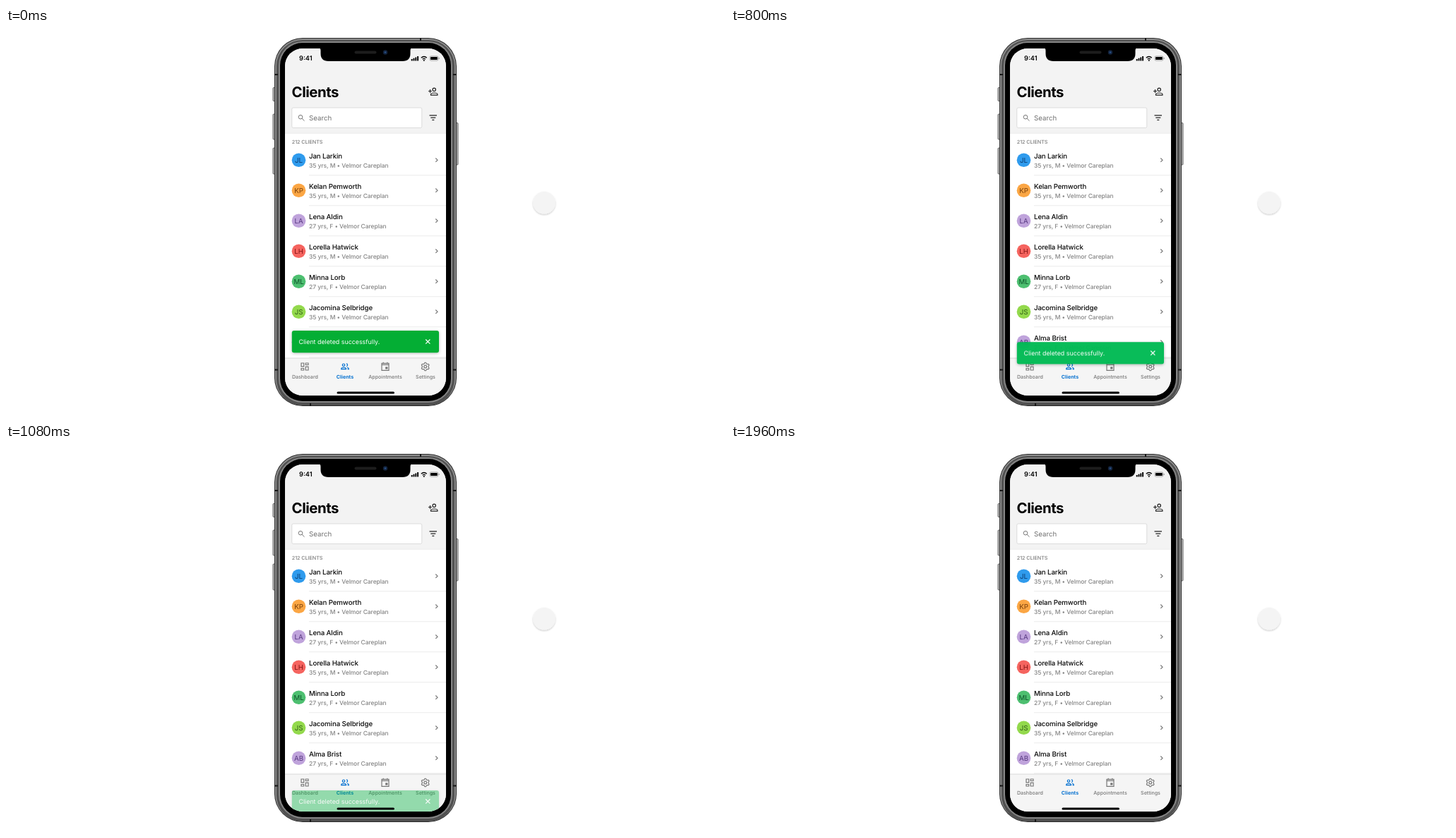
Write an HTML page that moves like this. It is 1018 px wide and 550 px high and loops after 2 s.

```html
<!DOCTYPE html>
<html lang="en">
<head>
<meta charset="utf-8">
<title>Client list</title>
<style>
  html, body { margin: 0; width: 100%; height: 100%; overflow: hidden; background: #fff; }
  svg { display: block; width: 1018px; height: 550px; }
  text { font-family: Inter, "Open Sans", sans-serif; text-rendering: geometricPrecision; }
  .time { font-size: 9.2px; font-weight: 600; }
  .title { font-size: 20.4px; font-weight: 700; letter-spacing: -.45px; }
  .search { font-size: 9.7px; fill: #717171; }
  .count { font-size: 7.2px; font-weight: 500; fill: #7c7c7c; letter-spacing: -.05px; }
  .initials { font-size: 9.7px; text-anchor: middle; }
  .name { font-size: 9.7px; font-weight: 500; fill: #080808; letter-spacing: -.1px; }
  .info { font-size: 8.5px; font-weight: 500; fill: #858585; letter-spacing: -.07px; }
  .tab { font-size: 7.1px; font-weight: 500; fill: #777; text-anchor: middle; }
  .tab.on { font-weight: 700; fill: #0b74d1; }
  .line { fill: none; stroke: #777; stroke-width: 1.2; }
  .thin { stroke-width: 1; }
  .ink { stroke: #222; }
  .blue { stroke: #0b74d1; }
  .toast { animation: leave 2s linear infinite; }
  .toast rect { fill: #04ae34; filter: drop-shadow(0 1px 2px #0004); animation: tint 2s linear infinite; }
  .toast text { font-size: 8.85px; fill: #fff; }
  @keyframes leave {
    0%, 32% { transform: none; opacity: 1; }
    36% { transform: translateY(6.4px); opacity: 1; }
    40% { transform: translateY(16px); opacity: .97; }
    50% { transform: translateY(46.8px); opacity: .55; }
    60% { transform: translateY(84.3px); opacity: .2; }
    66%, 100% { transform: translateY(108px); opacity: 0; }
  }
  @keyframes tint {
    0%, 32% { fill: #04ae34; }
    40% { fill: #00ba53; }
    50%, 100% { fill: #06b344; }
  }
</style>
</head>
<body>
<svg viewBox="0 0 1018 550">
  <defs>
    <clipPath id="screen"><rect x="395" y="29" width="228" height="492" rx="25"/></clipPath>
    <filter id="soft" x="-50%" y="-50%" width="200%" height="200%">
      <feDropShadow dx="0" dy="1.2" stdDeviation="1.2" flood-opacity=".22"/>
    </filter>
  </defs>

  <circle cx="762" cy="247.8" r="15.8" fill="#f4f4f4" filter="url(#soft)"/>

  <!-- Phone body: side buttons, then nested rims -->
  <g fill="#b5b5b5" stroke="#333" stroke-width=".7">
    <rect x="378" y="84.5" width="4" height="19" rx="1"/>
    <rect x="378" y="122" width="4" height="36" rx="1"/>
    <rect x="378" y="170" width="4" height="37" rx="1"/>
    <rect x="636" y="134.5" width="4" height="59.5" rx="1"/>
  </g>
  <rect x="380" y="14" width="258" height="522" rx="40" fill="#2b2b2b"/>
  <rect x="381" y="15" width="256" height="520" rx="39" fill="#8c8c8c"/>
  <rect x="383" y="17" width="252" height="518" rx="37" fill="#505050"/>
  <rect x="386" y="19" width="246" height="512" rx="34" fill="#858585"/>
  <rect x="388" y="21" width="242" height="508" rx="32"/>
  <path d="M380 66h5M633 66h5M380 484.500h5M633 484.500h5M587 14v4M431 532v4" stroke="#161616" stroke-width="2"/>

  <g clip-path="url(#screen)">
    <rect x="395" y="29" width="228" height="492" fill="#fff"/>
    <rect x="395" y="29" width="228" height="120" fill="#f3f3f3"/>
    <path d="M395 149.200h228" stroke="#e3e3e3" stroke-width=".7"/>
    <text class="time" x="415" y="46.200">9:41</text>

    <!-- Signal, wireless, battery -->
    <path d="M574.700 46.500v-2.500M577.500 46.500v-3.700M580.300 46.500v-5M583.100 46.500v-6.500" stroke="#000" stroke-width="1.900"/>
    <path d="M587.800 42.300q4-3.500 8 0M589.700 44.200q2.100-1.800 4.200 0" fill="none" stroke="#000" stroke-width="1.300"/>
    <circle cx="591.800" cy="45.900" r="1"/>
    <rect x="599.900" y="39.900" width="12" height="6.300" rx="1.800" fill="none" stroke="#888" stroke-width=".7"/>
    <rect x="601" y="41" width="9.800" height="4.100" rx=".8"/>
    <path d="M613 42v2" stroke="#888"/>

    <text class="title" x="404.500" y="98.200">Clients</text>
    <g class="line ink">
      <path d="M598 89.500h5M600.500 87v5M601.500 95.200v-1.200q0-2 4.700-2t4.700 2v1.200z"/>
      <circle cx="606.200" cy="87.300" r="2.200"/>
      <path d="M599.500 123.800h10.500M601.300 127.100h7M603.300 130.400h3"/>
    </g>
    <rect x="404.800" y="113" width="184" height="28.500" rx="2" fill="#fff" stroke="#d9d9d9" stroke-width=".9"/>
    <g class="line thin">
      <circle cx="417" cy="126.200" r="2.800"/>
      <path d="M419.100 128.300l3.400 3.400"/>
    </g>
    <text class="search" x="429" y="131">Search</text>
    <text class="count" x="404.800" y="163.600">212 CLIENTS</text>
    <g id="rows"></g>

    <!-- Tab bar -->
    <rect x="395" y="468" width="228" height="53" fill="#f5f5f5"/>
    <path d="M395 468h228" stroke="#d5d5d5" stroke-width=".9"/>
    <path class="line" d="M418 475h3.700v4.900h-3.700zM424.300 475h3.700v2.500h-3.700zM418 482.500h3.700v2.500h-3.700zM424.300 480.100h3.700v4.900h-3.700z"/>
    <g class="line blue">
      <circle cx="478" cy="477.700" r="1.700"/>
      <path d="M474.700 483.700v-.8q0-1.500 3.400-1.500t3.400 1.500v.8zM481.800 475.900a1.800 1.800 0 0 1 0 3.600M483 481.300q2.300.4 2.300 1.600v.8h-1.700"/>
    </g>
    <path class="line" d="M532 475.400h10v9.900h-10zM532 477.300h10M534.200 473.800v2M539.800 473.800v2"/>
    <rect x="537.200" y="480.300" width="3.200" height="3.200" fill="#777"/>
    <path class="line" id="gear" stroke-linejoin="round"/>
    <circle class="line" cx="593.700" cy="480" r="1.900"/>
    <text class="tab" x="423.400" y="497.200">Dashboard</text>
    <text class="tab on" x="480" y="497.200">Clients</text>
    <text class="tab" x="537" y="497.200">Appointments</text>
    <text class="tab" x="594" y="497.200">Settings</text>

    <g class="toast">
      <rect x="404.800" y="429" width="208.200" height="31.200" rx="3"/>
      <text x="414.500" y="447.600">Client deleted successfully.</text>
      <path d="M594.200 441.500l6.200 6.200m0-6.200l-6.200 6.200" stroke="#fff" stroke-width="1.200"/>
    </g>
    <rect x="468.500" y="515.500" width="81.500" height="3" rx="1.500"/>
  </g>

  <!-- Notch -->
  <path d="M442 28q3.500 0 3.500 4v4q0 11 11 11h105q11 0 11-11v-4q0-4 3.500-4z"/>
  <rect x="493.500" y="32.400" width="31" height="4" rx="2" fill="#1d1d1d"/>
  <circle cx="537" cy="34.500" r="3.200" fill="#14243d"/>
  <circle cx="537" cy="34.500" r="1.300" fill="#28528a"/>
</svg>
<script>
  const clients = [
    ["Jan Larkin", "35 yrs, M", "#2f9bed", "#0a3c70"],
    ["Kelan Pemworth", "35 yrs, M", "#fba644", "#793f0b"],
    ["Lena Aldin", "27 yrs, F", "#bfa3db", "#56367f"],
    ["Lorella Hatwick", "35 yrs, M", "#f5645f", "#821313"],
    ["Minna Lorb", "27 yrs, F", "#4dbf70", "#0d542a"],
    ["Jacomina Selbridge", "35 yrs, M", "#93d94c", "#315f18"],
    ["Alma Brist", "27 yrs, F", "#bfa3db", "#56367f"]
  ];
  const initials = name => name.split(" ").map(word => word[0]).join("");

  document.getElementById("rows").innerHTML = clients.map(([name, info, fill, ink], i) => `
    <g transform="translate(0 ${187.2 + i * 43})">
      <circle cx="414.500" r="9.800" fill="${fill}"/>
      <text class="initials" x="414.500" y="3.600" fill="${ink}">${initials(name)}</text>
      <text class="name" x="429" y="-2.700">${name}</text>
      <text class="info" x="429" y="11">${info} • Velmor Careplan</text>
      <path class="line" d="M608.300 -2.700l2.700 2.700l-2.700 2.700"/>
      <path d="M429 21.500H623" stroke="#e2e2e2" stroke-width=".7"/>
    </g>`).join("");

  // Six rounded teeth around the hub.
  const teeth = Array.from({ length: 24 }, (_, i) => {
    const angle = (i - .5) * Math.PI / 12 - Math.PI / 2;
    const radius = i % 4 < 2 ? 5.8 : 4.4;
    return `${593.7 + radius * Math.cos(angle)} ${480 + radius * Math.sin(angle)}`;
  });
  document.getElementById("gear").setAttribute("d", `M${teeth.join("L")}Z`);
</script>
</body>
</html>
```
